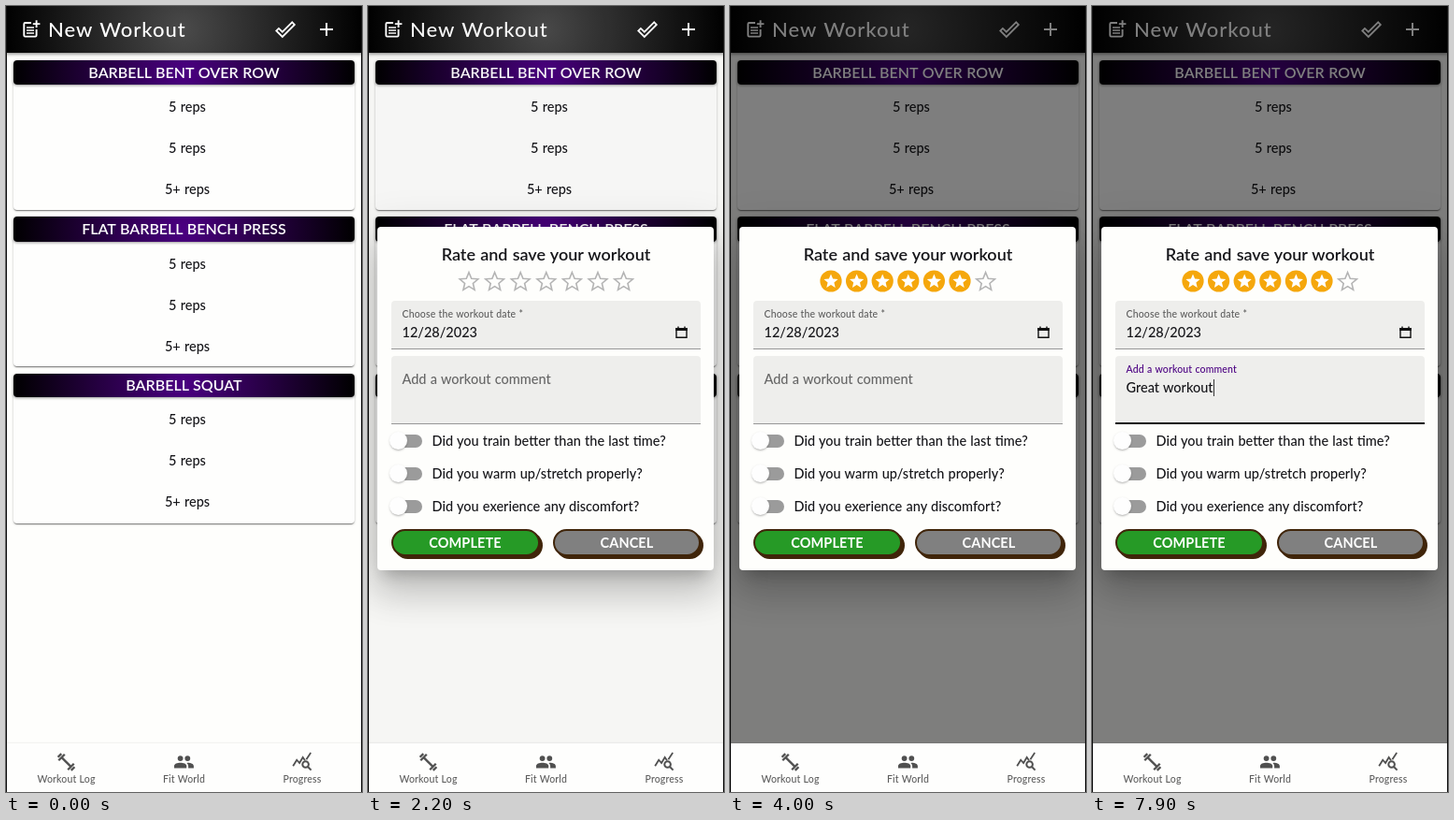
Recreate the animation shown at these times as an HTML page. Size 381 px wide and 840 px high, loop 8000 ms.

```html
<!DOCTYPE html>
<html lang="en">
<head>
<meta charset="utf-8">
<title>Workout log</title>
<style>
html, body { margin: 0; width: 100%; height: 100%; overflow: hidden; background: #fefefc; }
#stage { position: relative; width: 381px; height: 840px; overflow: hidden; background: #fefefc; }
.layer, .layer svg { position: absolute; left: 0; top: 0; width: 381px; height: 840px; }
.box { position: absolute; box-sizing: border-box; }
#shade { height: 788px; background: #000; opacity: 0; }
#dialog { transform-origin: 190px 420px; }
.bar { background: radial-gradient(circle, #4a4a4a, #000); box-shadow: 0 1px 4px #0008; }
.card { background: #fefefd; border-radius: 4px; box-shadow: 0 2px 1px -1px #0004, 0 1px 1px #0003, 0 1px 3px #0003; }
.head { background: radial-gradient(circle, #4b0082, #000); border-radius: 4px; box-shadow: 0 1px 3px #0006; }
.panel { background: #fefefc; border-radius: 4px; box-shadow: 0 11px 15px -7px #0003, 0 24px 38px 3px #00000024, 0 9px 46px 8px #0000001f; }
.field { background: #eeeeec; border-radius: 4px 4px 0 0; border-bottom: 1px solid #979797; }
.track { background: #9b9b9b; border-radius: 7px; }
.thumb { background: #fefefe; border-radius: 50%; box-shadow: 0 2px 2px -1px #0003, 0 1px 3px #0002; }
.pill { border: 2px solid #40250a; border-radius: 16px; box-shadow: 3px 3px 0 #40250a; }
.nav { background: #fefefd; box-shadow: 0 0 2px #0002; }
.edge { background: #111; }
text { font-family: Lato, "Open Sans", sans-serif; font-size: 14.5px; font-weight: 500; word-spacing: .04em; fill: #16161a; white-space: pre; }
.mid { text-anchor: middle; }
.title { font-size: 22px; letter-spacing: 1px; fill: #fff; }
.name { font-size: 16px; font-weight: 600; fill: #fff; }
.ask { font-size: 18px; font-weight: 600; }
.small { font-size: 10.5px; letter-spacing: .15px; fill: #5c5c5c; }
.btn { font-weight: 700; letter-spacing: .1px; fill: #fff; }
.line { fill: none; stroke: #505050; stroke-width: 2; }
.white { stroke: #fff; }
</style>
</head>
<body>
<div id="stage"></div>
<script>
const LOOP = 8000;
const box = (cls, x, y, w, h, css = '') =>
  `<div class="box ${cls}" style="left:${x}px;top:${y}px;width:${w}px;height:${h}px;${css}"></div>`;
const text = (cls, x, y, s, id = '') => `<text class="${cls}" x="${x}" y="${y}" id="${id}">${s}</text>`;
const line = (d, cls = '', extra = '') => `<path class="line ${cls}" d="${d}" ${extra}/>`;
const layer = (id, boxes, art) => `<div class="layer" id="${id}">${boxes}<svg>${art}</svg></div>`;

function star(cx, cy, r, attrs) {
  const pts = Array.from({ length: 10 }, (_, i) => {
    const a = Math.PI * (i / 5 - .5), d = i % 2 ? r * .45 : r;
    return (cx + d * Math.cos(a)).toFixed(2) + ',' + (cy + d * Math.sin(a)).toFixed(2);
  });
  return `<polygon points="${pts.join(' ')}" ${attrs}/>`;
}

// Workout page
const cards = [
  ['BARBELL BENT OVER ROW', 58, 26, 113],
  ['FLAT BARBELL BENCH PRESS', 225, 27, 281],
  ['BARBELL SQUAT', 393, 25, 447]
];
let pageBoxes = box('bar', 0, 0, 381, 50), pageArt = '';
for (const [name, y, h, base] of cards) {
  pageBoxes += box('card', 8, y, 365, 160) + box('head', 8, y, 365, h);
  pageArt += text('mid name', 190.5, y + h / 2 + 5.5, name);
  ['5 reps', '5 reps', '5+ reps'].forEach((s, i) => pageArt += text('mid', 194, base + i * 44, s));
}
pageArt += '<circle id="ripple" cx="299" cy="25" r="0" fill="#fff"/>' +
  text('title', 45, 33, 'New Workout') +
  line('M27 18H20.5Q19.3 18 19.3 19.2V31.3Q19.3 32.6 20.5 32.6H31.4Q32.6 32.6 32.6 31.3V25', 'white', 'style="stroke-width:1.9"') +
  line('M22 23H30M22 26H30M22 29H30', 'white', 'style="stroke-width:1.7"') +
  line('M32.6 15.3V23M28.8 19.1H36.4', 'white', 'style="stroke-width:1.9"') +
  line('M306.2 17.3L295.8 27.7L291.9 23.9L289.3 26.5L295.8 33L308.8 19.9Z', 'white', 'style="stroke-width:1.8"') +
  line('M343 18V32M336 25H350', 'white');

// Save dialog
let dlgBoxes = box('panel', 10, 236, 360, 367) +
  box('field', 25, 315, 331, 52) + box('field', 25, 374, 331, 73) +
  '<div id="focus" class="box" style="left:25px;top:445px;width:331px;height:2px;background:#111"></div>';
let dlgArt = text('mid ask', 190.5, 272, 'Rate and save your workout');
for (let i = 0; i < 7; i++) {
  const x = 108 + i * 27.6;
  dlgArt += star(x, 295, 10.3, 'class="empty" fill="none" stroke="#b4b4b4" stroke-width="1.6"');
  if (i < 6) dlgArt += `<g class="full"><circle cx="${x}" cy="294" r="11.6" fill="#f5a70c"/>${star(x, 294.5, 8, 'fill="#fff"')}</g>`;
}
dlgArt += text('small', 36.5, 333, 'Choose the workout date *') +
  text('', 36.5, 354, '12/28/2023') +
  line('M330 344.8H341V354.3H330Z', '', 'style="stroke:#111;stroke-width:1.4"') +
  line('M329.3 345.5H341.7', '', 'style="stroke:#111;stroke-width:3"') +
  line('M332 342.6V345M339 342.6V345', '', 'style="stroke:#111;stroke-width:1.4"') +
  text('', 36.5, 404, 'Add a workout comment', 'label') +
  text('', 36.5, 413, '', 'typed') +
  '<rect id="caret" y="399" width="1" height="18" fill="#333"/>';
['Did you train better than the last time?',
  'Did you warm up/stretch properly?',
  'Did you exerience any discomfort?'].forEach((s, i) => {
  const y = 464.5 + i * 35;
  dlgBoxes += box('track', 26, y - 7, 32, 14) + box('thumb', 23, y - 9.5, 19, 19);
  dlgArt += text('', 68.5, y + 5.5, s);
});
dlgBoxes += box('pill', 25, 559, 159, 29, 'background:#269a26') + box('pill', 198, 559, 158, 29, 'background:#808080');
dlgArt += text('mid btn', 104, 579, 'COMPLETE') + text('mid btn', 277, 579, 'CANCEL');

// Tab bar
const navArt = line('M-8 0H8M-7 -4.6V4.6M7 -4.6V4.6M-10 -2.6V2.6M10 -2.6V2.6', '', 'transform="translate(64.5 808) rotate(45)" style="stroke-width:2.3"') +
  '<g fill="#505050"><circle cx="186.6" cy="804.1" r="2.9"/><circle cx="194.3" cy="804.1" r="2.9"/>' +
  '<path d="M180 814.5V812.2C180 807.7 193.2 807.7 193.2 812.2V814.5Z"/>' +
  '<path d="M195.1 814.5V812.2Q195.1 810.3 193.4 808.9C196.5 808.4 200.9 809.6 200.9 812.2V814.5Z"/></g>' +
  line('M307.2 812.3L311.2 805.7L314.1 809L317.7 803L320 806.2M321.4 805.2L326.2 798', '', 'style="stroke-width:1.8"') +
  line('M323.2 813.2L326.6 816.6') + '<circle class="line" cx="320.6" cy="810.5" r="3.3"/>' +
  text('mid small', 64.5, 830, 'Workout Log') + text('mid small', 190.5, 830, 'Fit World') +
  text('mid small', 317, 830, 'Progress');

document.getElementById('stage').innerHTML =
  layer('page', pageBoxes, pageArt) + '<div class="layer" id="shade"></div>' +
  layer('dialog', dlgBoxes, dlgArt) +
  layer('tabs', box('nav', 0, 788, 381, 52) + box('edge', 0, 0, 1, 840) + box('edge', 380, 0, 1, 840), navArt);

// Steps: [time, value...], held until the next row
const dialogSteps = [[0, 0, .8], [2100, .5, .92], [2200, 1, 1]];
const shadeSteps = [[0, 0], [2200, .03], [2300, .43], [2400, .475], [2500, .49], [2600, .5]];
const rippleSteps = [[0, 0, 0], [2300, 14, .15], [2400, 18, .12], [2500, 20, .07], [2600, 20, .03], [2700, 0, 0]];
const focusSteps = [[0, 0], [4800, .35], [4900, .9], [5000, 1]];
const caretSteps = [[0, 0], [5000, 1], [5500, 0], [6000, 1]];
const typeSteps = [[0, 0], [6000, 1], [6100, 2], [6400, 4], [6600, 5], [7000, 6],
  [7300, 7], [7400, 8], [7500, 9], [7600, 10], [7700, 12], [7900, 13]];
const at = (steps, t) => steps.filter(s => s[0] <= t).pop().slice(1);

const $ = id => document.getElementById(id);
const fulls = document.querySelectorAll('.full'), empties = document.querySelectorAll('.empty');
const [dialog, shade, ripple, focusLine, label, typed, caret] =
  ['dialog', 'shade', 'ripple', 'focus', 'label', 'typed', 'caret'].map($);

function draw(t) {
  const [alpha, scale] = at(dialogSteps, t);
  dialog.style.opacity = alpha;
  dialog.style.transform = scale < 1 ? `scale(${scale})` : 'none';
  shade.style.opacity = at(shadeSteps, t)[0];

  const [r, glow] = at(rippleSteps, t);
  ripple.setAttribute('r', r);
  ripple.setAttribute('opacity', glow);

  const rated = t >= 4000;
  fulls.forEach((el, i) => {
    el.style.display = rated ? '' : 'none';
    empties[i].style.display = rated ? 'none' : '';
  });

  const [p] = at(focusSteps, t);
  focusLine.style.transform = `scaleX(${p})`;
  label.setAttribute('y', 404 - 12 * p);
  label.style.fontSize = 14.5 - 4 * p + 'px';
  label.style.letterSpacing = .15 * p + 'px';
  label.style.fill = p ? '#4b0082' : '#666';

  typed.textContent = 'Great workout'.slice(0, at(typeSteps, t)[0]);
  const width = typed.textContent ? typed.getComputedTextLength() : 0;
  caret.setAttribute('x', Math.round(36.5 + width));
  caret.style.display = at(caretSteps, t)[0] ? '' : 'none';
}

const start = performance.now();
function tick() {
  draw((performance.now() - start) % LOOP);
  requestAnimationFrame(tick);
}
tick();
</script>
</body>
</html>
```
